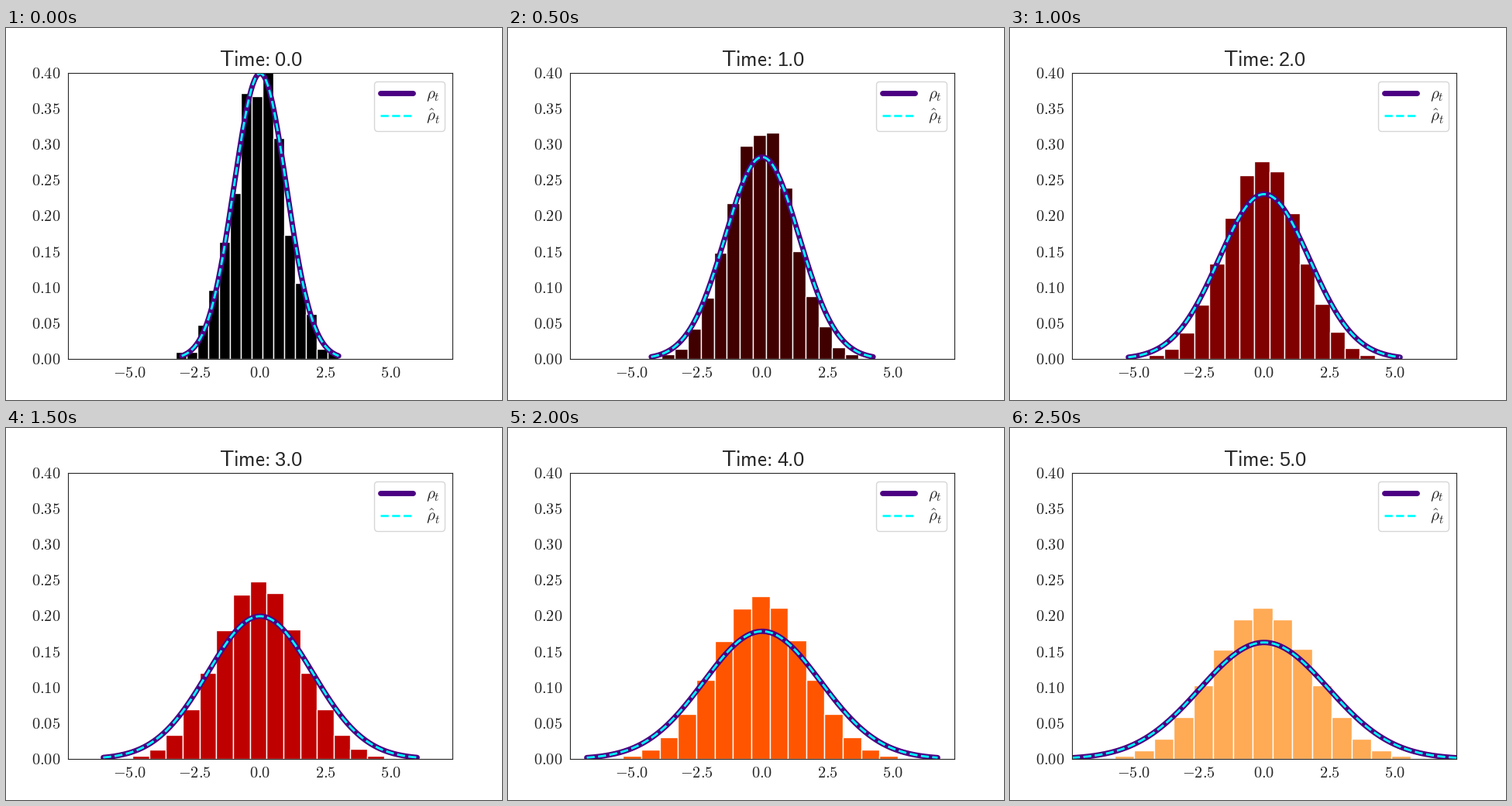
Animation, 640 px wide and 480 px high, one loop 3 s. Source, as a matplotlib script:

```python
import numpy as np
import matplotlib.pyplot as plt
from matplotlib.animation import FuncAnimation
from matplotlib.patches import FancyBboxPatch

INK = "0.15"
plt.rcParams.update({
    "font.family": "Liberation Serif",
    "mathtext.fontset": "cm",
    "text.color": INK,
    "axes.edgecolor": INK,
    "lines.solid_capstyle": "round",
})

STEPS = 6
LIMIT = 3 * np.sqrt(STEPS)
# Shares of the first sample in its bins, per thousand
START = np.array([4, 4, 20, 40, 68, 96, 154, 152, 182, 128, 72, 44, 26, 6, 4])
BINS = len(START)


def gauss(x, s):
    return np.exp(-0.5 * (x / s) ** 2) / (s * np.sqrt(2 * np.pi))


def heat(u):
    """Black through red and orange towards white."""
    return tuple(np.clip([1.5 * u, 2 * u - 1, 4 * u - 3], 0, 1))


def histogram(t):
    """Left edges, bin width and densities: the bins spread, the noise fades."""
    spread = np.sqrt(1 + 0.465 * t)
    width = 6.215 * spread / BINS
    index = np.arange(BINS)
    left = -0.116 / spread + (index - BINS / 2) * width
    smooth = gauss(index - BINS // 2, 2.5)
    share = smooth + (START / 1000 - smooth) * 0.33 ** t
    return left, width, share / width


fig, ax = plt.subplots(figsize=(6.4, 4.8), dpi=100)
ax.set_xlim(-LIMIT, LIMIT)
ax.set_ylim(0, 0.4)
xt = np.arange(-5, 5.1, 2.5)
yt = np.arange(9) * 0.05
ax.set_xticks(xt, [f"${v:.1f}$" for v in xt])
ax.set_yticks(yt, [f"${v:.2f}$" for v in yt])
ax.tick_params(left=False, bottom=False, length=3.5, pad=3.5,
               labelsize=14.7, labelcolor=INK)

bars = ax.bar(np.zeros(BINS), np.zeros(BINS), align="edge",
              edgecolor="white", linewidth=1)
exact, = ax.plot([], [], color="indigo", lw=5, label=r"$\rho_t$")
estimate, = ax.plot([], [], "--", color="cyan", lw=2, label=r"$\hat{\rho}_t$")

# Legend box in pixels, with the entries laid over it
ax.add_patch(FancyBboxPatch(
    (475, 347.5), 91, 64, boxstyle="round,pad=0,rounding_size=4.2",
    fc="white", ec="0.8", lw=1, alpha=0.8, snap=True, zorder=4, transform=None))
ax.legend(loc="upper left", bbox_to_anchor=(0.7964, 0.9718), fontsize=15,
          borderaxespad=0, labelspacing=0.31, frameon=False)


def heading(text, dx, **style):
    return ax.annotate(text, (0.5, 1), (dx, 6), xycoords="axes fraction",
                       textcoords="offset points", va="baseline", **style)


heading(r"$\mathsf{Time}\hspace{-0.2}:$", -38.5, ha="left", fontsize=19.5)
clock = heading("", 39, ha="right", fontsize=18.3, family="Liberation Sans")


def update(t):
    left, width, density = histogram(t)
    for bar, x, h in zip(bars, left, density):
        bar.set_bounds(x, 0, width, h)
        bar.set_facecolor(heat(t / STEPS))
    sigma = np.sqrt(1 + t)
    x = np.linspace(-3, 3, 200) * sigma
    for line in (exact, estimate):
        line.set_data(x, gauss(x, sigma))
    clock.set_text(f"{t:.1f}")
    return [*bars, exact, estimate, clock]


anim = FuncAnimation(fig, update, frames=STEPS, interval=500,
                     repeat=True, repeat_delay=0)
plt.show()
```
